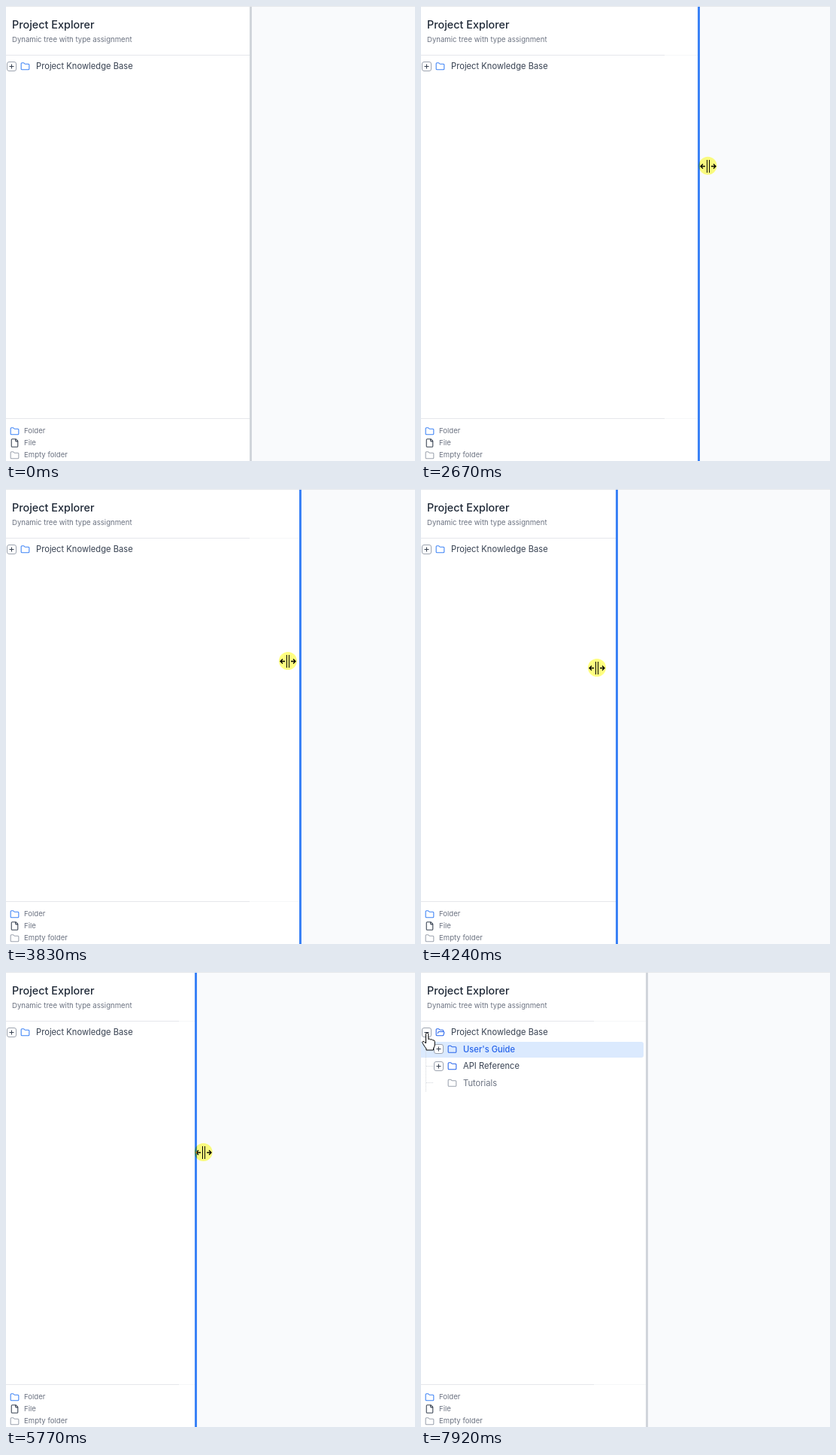
These frames come from a looping animation (544x606 px, 7.99 s). An HTML page with a canvas:

```html
<!DOCTYPE html>
<html lang="en">
<head>
<meta charset="utf-8">
<title>Project Explorer</title>
<style>
html, body { margin: 0; width: 100%; height: 100%; overflow: hidden; background: #fff; }
canvas { display: block; width: 544px; height: 606px; }
</style>
</head>
<body>
<canvas id="stage"></canvas>
<script>
const W = 544, H = 606, LOOP = 7990, START = 280, TICK = 67.6;
const canvas = document.getElementById('stage');
const ctx = canvas.getContext('2d');
const ratio = window.devicePixelRatio || 1;
canvas.width = W * ratio;
canvas.height = H * ratio;

const BLUE = '#3b82f6', DEEP = '#2563eb', INK = '#374151', MUTED = '#6b7280';
const SOFT = '#9ca3af', LINE = '#e5e7eb', FAINT = '#f6f7f8';

// Pointer path: tick, x, y
const PATH = [
  [0, 457, 485], [1, 402, 300], [2, 372, 219], [4, 372, 219], [9, 352, 200],
  [13, 336, 187], [16, 332, 190], [20, 327, 207], [23, 326, 207], [28, 326, 207],
  [34, 370, 212], [40, 439, 217], [42, 455, 218], [44, 463, 218], [46, 458, 219],
  [49, 425, 223], [52, 375, 229], [57, 261, 237], [58, 234, 238], [59, 232, 238],
  [61, 238, 239], [64, 269, 240], [66, 272, 240], [69, 272, 240], [74, 253, 240],
  [80, 253, 240], [85, 301, 240], [86, 301, 238], [88, 235, 198], [90, 156, 158],
  [92, 72, 108], [95, 40, 95], [100, 10, 81], [103, 7, 80]
];

// Ticks at which the state changes
const HOVER = 21, GRAB = 29, DROP = 86, COOL = 89, HAND = 100, PRESS = 106, OPEN = 109, RELEASE = 111;

const FOLDER = new Path2D('M4 20h16a2 2 0 0 0 2-2V8a2 2 0 0 0-2-2h-7.9a2 2 0 0 1-1.7-.9L9.6 3.9A2 2 0 0 0 7.9 3H4a2 2 0 0 0-2 2v13a2 2 0 0 0 2 2z');
const FOLDER_OPEN = new Path2D('M6 14l1.5-2.9A2 2 0 0 1 9.2 10H20a2 2 0 0 1 1.9 2.5l-1.5 6a2 2 0 0 1-2 1.5H4a2 2 0 0 1-2-2V5a2 2 0 0 1 2-2h3.9a2 2 0 0 1 1.7.9l.8 1.2a2 2 0 0 0 1.7.9H18a2 2 0 0 1 2 2v2');
const FILE = new Path2D('M15 2H6a2 2 0 0 0-2 2v16a2 2 0 0 0 2 2h12a2 2 0 0 0 2-2V7zM14 2v4a2 2 0 0 0 2 2h4');
const ARROW = new Path2D('M.5.5V16.5L4.2 13L6.8 19L9.3 18L6.8 12.2H11.8Z');
const FINGER = new Path2D('M-1.5 1.5Q-1.5 0 0 0T1.8 1.5V8.5Q3.5 7.4 4.8 9Q6.6 8.2 7.8 9.9Q10 9.3 10.3 11.5V16Q10.3 18.5 8.5 20.5V23H-1V21Q-3 18.8-5.5 14.5Q-7 12-5.5 11.4Q-3.8 11-1.5 14Z');

const lerp = (a, b, p) => a + (b - a) * p;

function pointer(k) {
  const i = PATH.findIndex(p => p[0] > k);
  if (i < 0) return PATH[PATH.length - 1].slice(1);
  const a = PATH[Math.max(i - 1, 0)], b = PATH[i];
  const p = Math.max(0, (k - a[0]) / (b[0] - a[0]));
  return [lerp(a[1], b[1], p), lerp(a[2], b[2], p)];
}

// The divider trails the pointer by one tick.
function dividerX(k) {
  if (k < GRAB) return 324;
  if (k >= DROP) return 299;
  return Math.round(pointer(k - 1)[0] - 2);
}

function dividerColor(k) {
  if (k < HOVER) return '#d1d5db';
  const p = Math.min(1, Math.max(0, (k - COOL) / 3)) ** 2;
  return `rgb(${lerp(59, 209, p)},${lerp(130, 213, p)},${lerp(246, 219, p)})`;
}

function rect(x, y, w, h, color) {
  ctx.fillStyle = color;
  ctx.fillRect(x, y, w, h);
}

function text(str, x, y, size, color, weight = 400) {
  ctx.font = `${weight} ${size}px Inter, sans-serif`;
  ctx.fillStyle = color;
  ctx.fillText(str, x, y);
}

function icon(path, cx, cy, color) {
  const s = 12.8 / 24;
  ctx.save();
  ctx.translate(cx - 6.4, cy - 6.4);
  ctx.scale(s, s);
  ctx.strokeStyle = color;
  ctx.lineWidth = 2;
  ctx.lineJoin = ctx.lineCap = 'round';
  ctx.stroke(path);
  ctx.restore();
}

function toggle(cx, cy, open) {
  ctx.beginPath();
  ctx.roundRect(cx - 6, cy - 6, 12, 12, 2.5);
  ctx.fillStyle = '#fff';
  ctx.fill();
  ctx.strokeStyle = SOFT;
  ctx.lineWidth = 1;
  ctx.stroke();
  rect(cx - 3, cy - 0.5, 6, 1, INK);
  if (!open) rect(cx - 0.5, cy - 3, 1, 6, INK);
}

function rule(y, edge, full) {
  rect(0, y, edge, 1, FAINT);
  rect(0, y, Math.min(edge, full), 1, LINE);
}

function children() {
  ctx.beginPath();
  ctx.roundRect(0, 93, 296, 21, [0, 3, 3, 0]);
  ctx.fillStyle = '#dbeafe';
  ctx.fill();
  ctx.setLineDash([1, 1]);
  ctx.strokeStyle = '#d1d5db';
  ctx.lineWidth = 1;
  ctx.beginPath();
  ctx.moveTo(6.5, 92);
  ctx.lineTo(6.5, 159);
  for (const y of [102.5, 125.5, 147.5]) {
    ctx.moveTo(7, y);
    ctx.lineTo(17, y);
  }
  ctx.stroke();
  ctx.setLineDash([]);
  toggle(23.5, 102.5, false);
  toggle(23.5, 125.5, false);
  icon(FOLDER, 41.5, 103, DEEP);
  icon(FOLDER, 41.5, 125.5, DEEP);
  icon(FOLDER, 41.5, 148, SOFT);
  text("User's Guide", 56, 107, 11.2, DEEP, 500);
  text('API Reference', 56, 129, 11.2, INK);
  text('Tutorials', 56, 152, 11.2, MUTED);
}

function panel(k) {
  const edge = dividerX(k), open = k >= OPEN;
  rect(0, 0, W, H, '#fff');
  rect(edge, 0, W - edge, H, '#f9fafc');
  rect(0, 0, W, 1, LINE);
  const full = k < 53 ? 324 : k < 60 ? 260 : 230;
  rule(65, edge, full);
  rule(549, edge, full);
  text('Project Explorer', 8, 30, 14.4, '#1f2937', 500);
  text('Dynamic tree with type assignment', 8, 48, 9.6, MUTED);
  if (open) children();
  toggle(7.5, 80.5, open);
  icon(open ? FOLDER_OPEN : FOLDER, 25.5, 80.5, open ? DEEP : BLUE);
  text('Project Knowledge Base', 40, 84, 11.2, INK);
  icon(FOLDER, 11.5, 566.5, BLUE);
  icon(FILE, 11.5, 582, INK);
  icon(FOLDER, 11.5, 598.5, SOFT);
  ['Folder', 'File', 'Empty folder'].forEach((s, i) => text(s, 24, 569 + i * 16, 9.6, MUTED));
  rect(edge, 1, 3, H - 1, dividerColor(k));
}

// Inverts whatever lies under it.
function resizeCursor(x, y) {
  ctx.save();
  ctx.translate(Math.round(x), Math.round(y));
  ctx.globalCompositeOperation = 'difference';
  rect(-2, -8, 1, 17, '#fff');
  rect(1, -8, 1, 17, '#fff');
  ctx.strokeStyle = '#fff';
  ctx.lineWidth = 1.3;
  ctx.beginPath();
  for (const d of [-1, 1]) {
    ctx.moveTo(d * 4, 0.5);
    ctx.lineTo(d * 10, 0.5);
    ctx.moveTo(d * 7, -2.5);
    ctx.lineTo(d * 10, 0.5);
    ctx.lineTo(d * 7, 3.5);
  }
  ctx.stroke();
  ctx.restore();
}

function shapeCursor(path, x, y) {
  ctx.save();
  ctx.translate(Math.round(x), Math.round(y));
  ctx.fillStyle = '#fff';
  ctx.strokeStyle = '#000';
  ctx.lineWidth = 1;
  ctx.fill(path);
  ctx.stroke(path);
  ctx.restore();
}

function glow(x, y) {
  ctx.save();
  ctx.globalCompositeOperation = 'multiply';
  ctx.fillStyle = '#ffff80';
  ctx.beginPath();
  ctx.arc(x, y, 12, 0, Math.PI * 2);
  ctx.fill();
  ctx.restore();
}

function cursor(k) {
  const [x, y] = pointer(k);
  if (k >= HOVER && k <= DROP) resizeCursor(x, y);
  else if (k >= HAND) shapeCursor(FINGER, x + 1, y + 1);
  else shapeCursor(ARROW, x, y);
  if ((k >= GRAB && k < DROP) || (k >= PRESS && k < RELEASE)) glow(x, y);
}

function draw(now) {
  const k = Math.floor(((now % LOOP) - START) / TICK);
  ctx.setTransform(ratio, 0, 0, ratio, 0, 0);
  panel(k);
  if (k >= 0) cursor(k);
}

let origin;
function loop(now) {
  origin ??= now;
  draw(now - origin);
  requestAnimationFrame(loop);
}
draw(0);
requestAnimationFrame(loop);
</script>
</body>
</html>
```
